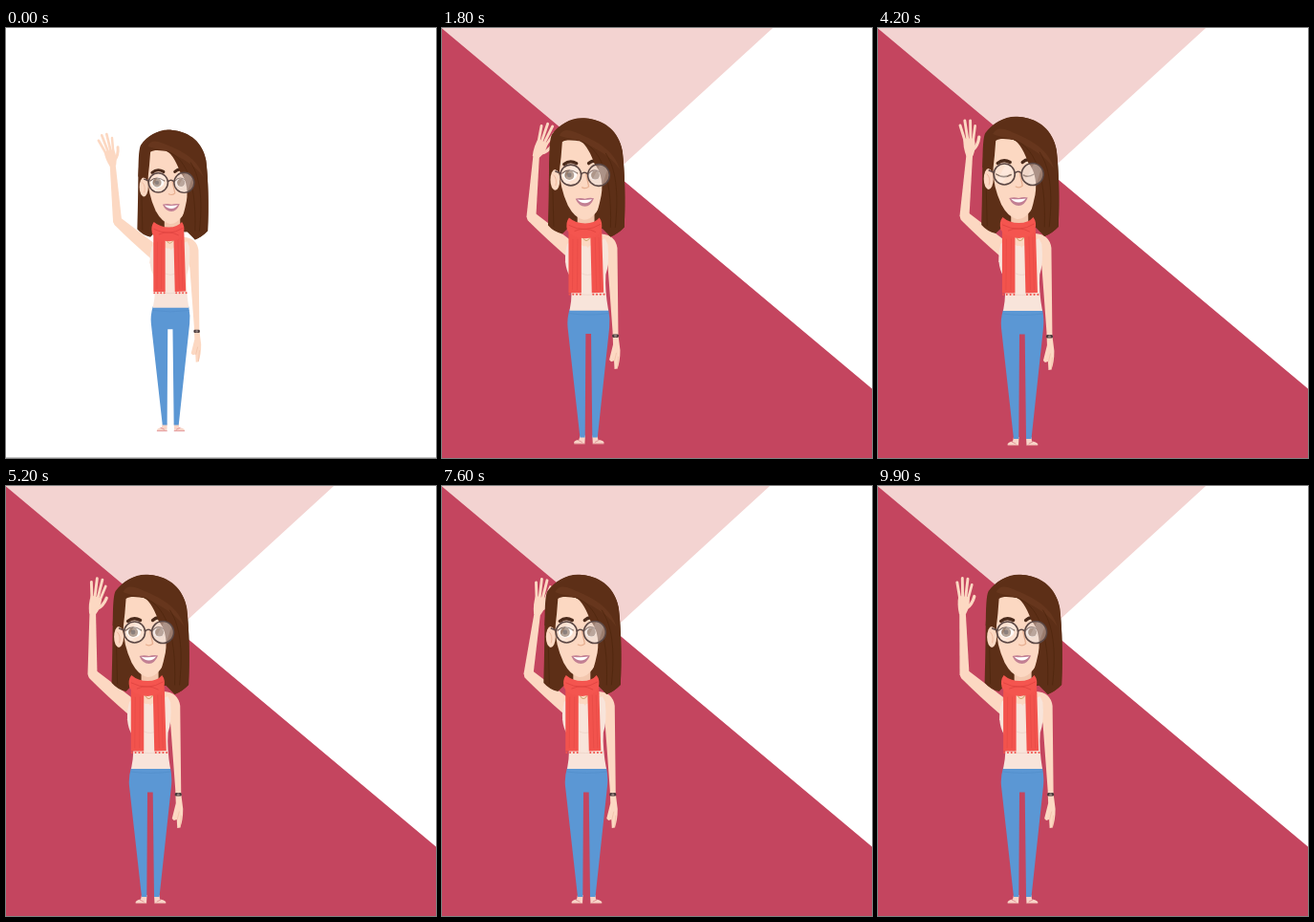
Recreate the animation shown at these times as an HTML page. Size 450 by 450 pixels, loop 10 s.

```html
<!DOCTYPE html>
<html lang="en">
<head>
<meta charset="utf-8">
<title>Waving woman</title>
<style>
  html, body { margin: 0; width: 100%; height: 100%; overflow: hidden; background: #fff; }
  svg { display: block; width: 100vw; height: 100vh; }
  .skin { fill: #fcd8c2; }
  .hair { fill: #5d2f17; }
  .fingers { fill: none; stroke: #fcd8c2; stroke-linecap: round; }
  .line { fill: none; stroke-linecap: round; }
</style>
</head>
<body>
<svg viewBox="0 0 450 450">
  <rect y="449" width="450" height="1" fill="#c6c6c6"/>
  <path id="pink" fill="#f3d3d1" d="M-40-400H780L343 0 0 314H-40Z"/>
  <path id="crimson" fill="#c4455f" d="M-20-16.500 0 .5 450 377.500V460H-20Z"/>

  <g id="woman">
    <!-- waving arm -->
    <path class="skin" d="M86 198Q88 191 95.500 194L131 221 128 239Q106 220 88 202Z"/>
    <g id="forearm">
      <path class="skin" d="M85.500 197 88 131H94.500L95.500 197Q92 205 87 201Z"/>
      <g id="hand">
        <path class="skin" d="M87.800 134Q85 124 86.500 115L98 116Q99 126 94.700 134Z"/>
        <g class="fingers">
          <path stroke-width="2.900" d="M88 118 84.500 101M90.800 116 89.800 96.500M94 116 95.500 97"/>
          <path stroke-width="2.700" d="M96.500 118 100 103"/>
          <path stroke-width="3.200" d="M95 128Q101 124 103 115"/>
        </g>
      </g>
    </g>

    <!-- resting arm -->
    <g id="rest">
      <path class="skin" d="M164 215Q179 216 181 230L182 322 184 338Q184 350 181 357.500L178 358 177.500 349 174.500 350 172.500 348 176.500 332 176 318 171 250Z"/>
      <path class="line" stroke="#eebda4" stroke-width=".7" d="M178 349 180 341M181 357 182 345"/>
      <rect x="175.500" y="321" width="7" height="3.600" rx="1.400" fill="#4b3a3b"/>
      <circle cx="179" cy="322.800" r="1.500" fill="#8b7a77"/>
    </g>

    <!-- legs and feet -->
    <path fill="#f8d5c8" d="M142 428H147.500L147 437H136Q134 434 141 432.500ZM155 428H160.500L161 432.500Q169 434 167 437H155.500Z"/>
    <path class="line" stroke="#db8088" stroke-width=".8" d="M136 436.700H147M155.500 436.700H167M140 433 144 435M158 435 162 433"/>
    <path fill="#5b97d4" d="M131 294.500H172Q174 305 173 314L160.500 430H155L153.700 320.500H148L147.300 430H142L129 314Q128 305 131 294.500Z"/>
    <path class="line" stroke="#528ecb" stroke-width=".7" d="M131 299Q151 302 172 299"/>

    <g id="torso">
      <path class="skin" d="M129 222Q150 210 171 220L173 245H126Z"/>
      <path fill="#f8e4da" d="M128 226 133 221 145 228H152L168 220 171 226Q173 246 169 258 168 275 172 296H131Q135 275 131 260 123 246 128 226Z"/>
      <path class="line" stroke="#eed3c8" stroke-width=".8" d="M144 257Q150 260 156 257M133 278Q150 281 169 278"/>
      <path class="skin" d="M140 215H158L150 230Z"/>
      <path class="line" stroke="#d0a874" stroke-width="1" d="M144 218Q148 227 153 218"/>
    </g>

    <g id="head">
      <path class="hair" d="M147 93C133 91 119 99 111 110 107 118 109 146 107 206Q113 213 122 215L128 209H164L173 218Q181 215 187.500 208C189 180 188 148 185.500 128 182 107 168 95 147 93Z"/>
      <path fill="#f3c7ae" d="M138 185H156V208H138Z"/>
      <ellipse class="skin" cx="114.500" cy="158" rx="5" ry="11"/>
      <path class="line" stroke="#edb99e" stroke-width="1" d="M113 153Q117 157 115 164"/>
      <path class="skin" d="M121 116H151Q168 130 168 153 168 179 158 192 151 201 144 200 135 198 128 185 119 166 119 145Z"/>

      <path class="line" stroke="#4a2a1b" stroke-width="3.400" d="M124 141.500Q130 136.500 137 140.500M150 140.500Q155 136 161 139"/>
      <path class="line" stroke="#e7b092" stroke-width="1.300" d="M147 151Q149 160 150 165 147 168 143 166"/>
      <path fill="#c27f93" d="M136 178Q141 176.500 146 178 151 176.500 155.500 177.500 152 186 146 186 139.500 186 136 178Z"/>
      <path fill="#fff" d="M138 178.800Q146 180 153.500 178.500 150.500 182.500 146 182.500 141 182.500 138 178.800Z"/>

      <g id="open">
        <ellipse cx="130" cy="153" rx="7.500" ry="5.800" fill="#fffaf6"/>
        <ellipse cx="156" cy="153" rx="6" ry="5.200" fill="#fffaf6"/>
        <circle cx="129.500" cy="153" r="5" fill="#7d5d48"/>
        <circle cx="129.500" cy="153" r="2.400" fill="#35221c"/>
        <circle cx="157" cy="153" r="4.500" fill="#7d5d48"/>
        <path class="line" stroke="#563b31" stroke-width="1.200" d="M122 151Q129 144.500 138 151M150 151Q155 145 162 150"/>
      </g>
      <g id="closed" display="none">
        <path class="line" stroke="#5e4133" stroke-width="1.500" d="M122.500 153Q130 158 138 153.500M151 154Q156 157 162 153"/>
      </g>

      <!-- front hair -->
      <path class="hair" d="M122 118C127 114 137 117 141 117 147 120 153 132 156 141 164 150 166 166 162 180 160 190 156 197 158 209H166L173 218Q181 215 187.500 208C189 180 188 146 185.500 127 182 107 164 94 147 93 128 92 112 104 110 117L108 146Q114 146 119 149 121 134 122 118Z"/>
      <path fill="#6a391e" opacity=".8" d="M119 111C124 101 134 107 146 112 162 119 177 128 183 147 172 131 156 125 144 118 134 114 125 114 119 111Z"/>
      <path class="line" stroke="#51280f" stroke-width=".9" d="M141 117C161 124 175 150 173 208M168 130C181 149 181 180 178 208M112 168 113 207"/>

      <!-- glasses -->
      <circle cx="131" cy="153" r="11" fill="#fff" opacity=".24"/>
      <circle cx="160.500" cy="153" r="11.500" fill="#e4d6d0" opacity=".48"/>
      <path fill="#fff" opacity=".16" d="M162 142 152 161Q157 166 164 164L170 147Q167 142 162 142Z"/>
      <path fill="#fff" opacity=".25" d="M133 142 123 160 128 163 140 147Z"/>
      <g class="line" stroke="#5b4744" stroke-width="1.600">
        <circle cx="131" cy="153" r="11"/>
        <circle cx="160.500" cy="153" r="11.500"/>
        <path d="M142 152Q145.500 148.500 149 152M120 151 115 149"/>
      </g>
    </g>

    <g id="scarf">
      <path fill="#f2534d" d="M130.500 210 144 214V277.500H130.500ZM153.500 213 165.500 210 167.500 277 155 277.500Z"/>
      <path fill="#f4554f" d="M131 198Q138 204 148 204 158 204 163 198 167 203 165 211 162 219 148 220 133 219 129 211 127 203 131 198Z"/>
      <path class="line" stroke="#e04541" stroke-width=".9" d="M131 206Q148 215 164 205M137 212Q148 207 159 213"/>
      <path class="line" stroke="#e84c47" stroke-width=".8" d="M135 221 134.500 274M140 221 139.500 274M158.500 219 160 274M162.500 219 164 274"/>
      <path class="line" stroke="#f2534d" stroke-width="2" stroke-dasharray=".1 3.700" d="M131.500 279H144M156.500 279H168"/>
    </g>
  </g>
</svg>
<script>
  const LOOP = 10000, STEP = 100, WAVE = 2000 / 3, ENTRY = 2300;
  const el = id => document.getElementById(id);
  const move = (id, value) => el(id).setAttribute('transform', value);
  const clamp = x => Math.min(1, Math.max(0, x));
  const wave = (t, lag = 0) => Math.cos((t - lag) / WAVE * 2 * Math.PI);
  const easeOut = x => 1 - (1 - x) ** 3;

  function draw(t) {
    // backdrop sweeps in while the figure settles
    const away = 1 - easeOut(clamp(t / 1100));
    const rest = (1 + Math.cos(Math.PI * clamp(t / ENTRY))) / 2;
    move('pink', `translate(${28 * rest} ${-400 * away})`);
    move('crimson', `translate(${-60 * away} ${460 * away})`);
    move('woman', `translate(${151 + 21 * rest} ${437 - 15 * rest}) scale(${1 - 0.084 * rest}) translate(-151 -437)`);

    const sway = 2.4 + 3.8 * wave(t);
    const lean = 0.35 * sway;
    move('head', `translate(${sway} 0)`);
    move('scarf', `translate(${lean - 1} 0)`);
    move('rest', `translate(${lean} 0)`);
    move('torso', `translate(0 297) skewX(${-lean * 0.7}) translate(0 -297)`);

    const arm = 1.8 - 7.2 * wave(t);
    const hand = 2 + 25 * wave(t, 400);
    move('forearm', `rotate(${arm} 91 197)`);
    move('hand', `rotate(${hand - arm} 91 132)`);

    const phase = t % 2000;
    const shut = phase >= 150 && phase < 300;
    el('open').setAttribute('display', shut ? 'none' : 'inline');
    el('closed').setAttribute('display', shut ? 'inline' : 'none');
  }

  const start = performance.now();
  function tick() {
    const t = (performance.now() - start) % LOOP;
    draw(Math.floor(t / STEP) * STEP);
    requestAnimationFrame(tick);
  }
  tick();
</script>
</body>
</html>
```
